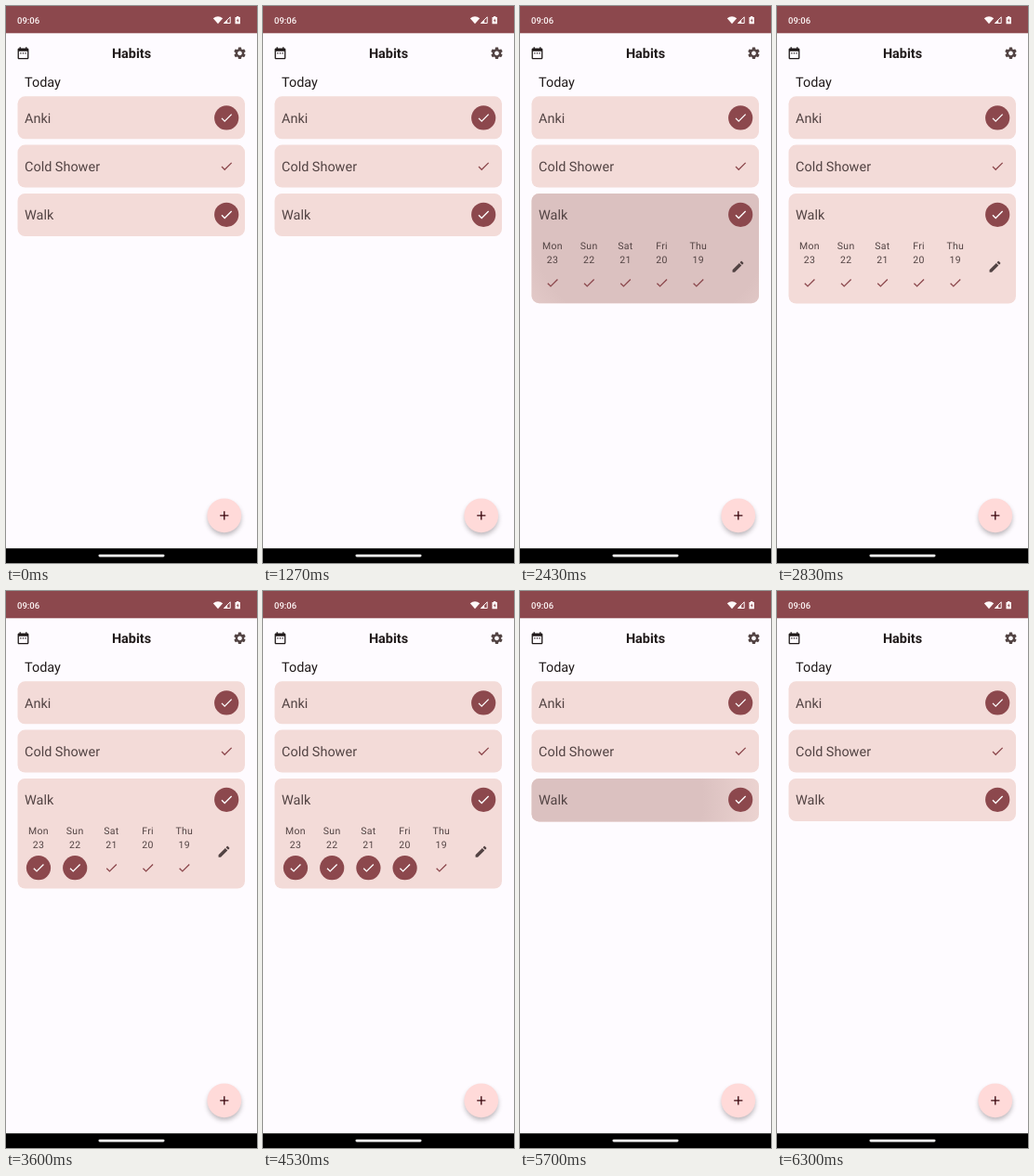
Recreate the animation shown at these times as an HTML page. Size 270x600 px, loop 6330 ms.

```html
<!DOCTYPE html>
<html lang="en">
<head>
<meta charset="utf-8">
<title>Habits</title>
<style>
  html, body { margin: 0; width: 100%; height: 100%; overflow: hidden; background: #fefbff; }
  svg { display: block; width: 270px; height: 600px; font: 14.44px Roboto, sans-serif; text-rendering: geometricPrecision; }
  .card { fill: #f3dbd8; }
  .label { fill: #524343; }
  .day { font-size: 10.5px; letter-spacing: .33px; text-anchor: middle; fill: #524343; }
  .dark { fill: #201a1a; }
  .disc { fill: #8c484d; }
  .status { fill: #fff8f8; }
</style>
</head>
<body>
<svg viewBox="0 0 270 600">
  <defs>
    <path id="check" d="M9 16.17 4.83 12l-1.42 1.41L9 19 21 7l-1.41-1.41z" transform="scale(.657) translate(-12 -12)"/>
    <clipPath id="walkClip"><rect id="walkShape" x="12.5" y="202" width="244.5" height="46" rx="8"/></clipPath>
    <radialGradient id="wave" gradientUnits="userSpaceOnUse" cy="225">
      <stop stop-color="#dbc1c0"/>
      <stop id="waveCore" stop-color="#dbc1c0"/>
      <stop offset="1" stop-color="#dbc1c0" stop-opacity="0"/>
    </radialGradient>
    <filter id="blur" x="-50%" y="-50%" width="200%" height="200%"><feGaussianBlur stdDeviation="2.4"/></filter>
  </defs>

  <rect width="270" height="600" fill="#fefbff"/>
  <rect class="disc" width="270" height="29.3"/>
  <g class="status">
    <text x="12" y="18.6" font-size="9.5" font-weight="500">09:06</text>
    <path d="M222.8 13.2Q228 9.2 233.2 13.2L228 19.2z"/>
    <path d="M241.2 11.8v6.7h-6.8z" fill="none" stroke="#fff8f8"/>
    <path d="M238.2 14.6v3.9h-3.8z"/>
    <path d="M246.5 12h1.5v-1h2.4v1h1.5v7.3h-5.4z"/>
    <path class="disc" d="M249.7 13.2l-1.7 2.7h1.1v2l1.5-2.7h-1z"/>
  </g>

  <g class="dark">
    <path transform="translate(10.6 42.9) scale(.657)" d="M9 11H7v2h2zm4 0h-2v2h2zm4 0h-2v2h2zm2-7h-1V2h-2v2H8V2H6v2H5c-1.1 0-2 .9-2 2v14c0 1.1.9 2 2 2h14c1.1 0 2-.9 2-2V6c0-1.1-.9-2-2-2zm0 16H5V9h14z"/>
    <path class="label" transform="translate(243.6 42.9) scale(.657)" d="M19.14 12.94c.04-.3.06-.61.06-.94s-.02-.64-.07-.94l2.03-1.58c.18-.14.23-.41.12-.61l-1.92-3.32c-.12-.22-.37-.29-.59-.22l-2.39.96c-.5-.38-1.03-.7-1.62-.94l-.36-2.54c-.04-.24-.24-.41-.48-.41h-3.84c-.24 0-.43.17-.47.41l-.36 2.54c-.59.24-1.13.57-1.62.94l-2.39-.96c-.22-.08-.47 0-.59.22L2.74 8.87c-.12.21-.08.47.12.61l2.03 1.58c-.05.3-.09.63-.09.94s.02.64.07.94l-2.03 1.58c-.18.14-.23.41-.12.61l1.92 3.32c.12.22.37.29.59.22l2.39-.96c.5.38 1.03.7 1.62.94l.36 2.54c.05.24.24.41.48.41h3.84c.24 0 .44-.17.47-.41l.36-2.54c.59-.24 1.13-.56 1.62-.94l2.39.96c.22.08.47 0 .59-.22l1.92-3.32c.12-.22.07-.47-.12-.61zM12 15.6c-1.98 0-3.6-1.62-3.6-3.6s1.62-3.6 3.6-3.6 3.6 1.62 3.6 3.6-1.62 3.6-3.6 3.6z"/>
    <text x="135" y="56" font-weight="700" text-anchor="middle">Habits</text>
    <text x="20" y="87">Today</text>
  </g>

  <rect class="card" x="12.5" y="97.3" width="244.5" height="46" rx="8"/>
  <rect class="card" x="12.5" y="149.6" width="244.5" height="46" rx="8"/>
  <g clip-path="url(#walkClip)">
    <rect class="card" x="12" y="201" width="246" height="121"/>
    <rect id="ripple" x="12" y="201" width="246" height="121" fill="url(#wave)"/>
    <g id="details">
      <path class="label" transform="translate(226.6 272.9) scale(.657)" d="M3 17.25V21h3.75L17.81 9.94l-3.75-3.75zM20.71 7.04c.39-.39.39-1.02 0-1.41l-2.34-2.34c-.39-.39-1.02-.39-1.41 0l-1.83 1.83 3.75 3.75z"/>
    </g>
  </g>
  <g id="habits" class="label">
    <text x="20" y="126">Anki</text>
    <text x="20" y="178.2">Cold Shower</text>
    <text x="20" y="230.4">Walk</text>
  </g>

  <circle cx="235" cy="552" r="18" fill="#5c5358" opacity=".4" filter="url(#blur)"/>
  <circle cx="234.8" cy="548.8" r="18.4" fill="#ffdad9"/>
  <path d="M230.2 548.8h9.2m-4.6-4.6v9.2" stroke="#3b080f" stroke-width="1.35"/>
  <rect y="584.25" width="270" height="16"/>
  <rect x="99.5" y="590.8" width="71" height="2.6" rx="1.3" fill="#fff"/>
</svg>
<script>
const LOOP = 6330, OPEN = 2060, CLOSE = 5340;
const TOGGLES = [3150, 3550, 3950, 4350];
const $ = id => document.getElementById(id);
const progress = (t, start, length) => Math.max(0, Math.min(1, (t - start) / length));

// Critically damped spring from 0 to 1.
function spring(ms) {
  const x = Math.max(0, ms) * .02;
  return 1 - (1 + x) * Math.exp(-x);
}

function add(parent, tag, attributes, text = '') {
  const node = document.createElementNS('http://www.w3.org/2000/svg', tag);
  for (const [key, value] of Object.entries(attributes)) node.setAttribute(key, value);
  node.textContent = text;
  return parent.appendChild(node);
}

// Returns a setter: false shows a bare tick, true a filled disc.
function addToggle(parent, x, y) {
  const group = add(parent, 'g', { transform: `translate(${x} ${y})` });
  add(group, 'use', { href: '#check', class: 'disc' });
  const filled = add(group, 'g', {});
  add(filled, 'circle', { r: 13.1, class: 'disc' });
  add(filled, 'use', { href: '#check', fill: '#fff' });
  return on => filled.setAttribute('opacity', on ? 1 : 0);
}

[true, false, true].forEach((done, i) => addToggle($('habits'), 237.2, 120.4 + 52.2 * i)(done));

const dayToggles = ['Mon', 'Sun', 'Sat', 'Fri', 'Thu'].map((name, i) => {
  const x = 35 + 39.2 * i;
  add($('details'), 'text', { x, y: 261.6, class: 'day' }, name);
  add($('details'), 'text', { x, y: 277.2, class: 'day' }, 23 - i);
  return addToggle($('details'), x, 298.2);
});

function drawRipple(t) {
  const closing = t >= CLOSE;
  const age = t - (closing ? CLOSE : OPEN);
  const core = Math.max(0, age * .35), outer = core + 90;
  $('wave').setAttribute('cx', closing ? 70 : 140);
  $('wave').setAttribute('r', outer);
  $('waveCore').setAttribute('offset', core / outer);
  $('ripple').setAttribute('opacity', progress(age, 0, 75) * (1 - progress(age, 450, 300)));
}

function draw(now) {
  const t = now % LOOP;
  const open = spring(t - OPEN) - spring(t - CLOSE);
  $('walkShape').setAttribute('height', 46 + 72.5 * open);
  $('details').setAttribute('opacity', open);
  dayToggles.forEach((set, i) => set(t >= TOGGLES[i]));
  drawRipple(t);
}

const start = performance.now();
function tick() {
  draw(performance.now() - start);
  requestAnimationFrame(tick);
}
tick();
</script>
</body>
</html>
```
